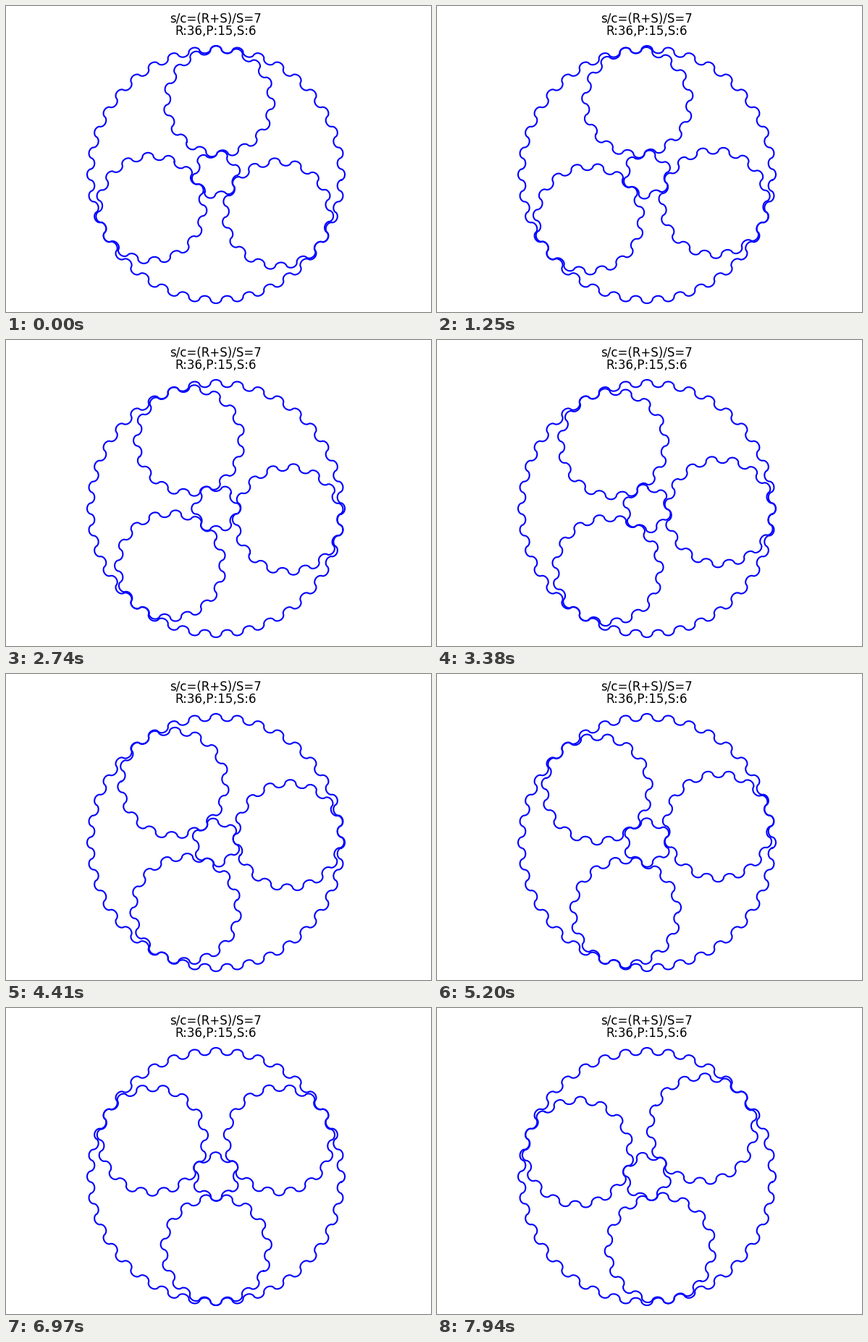
Write a matplotlib script that moves like this. It is 587 px wide and 423 px high and loops after 8000 ms.

```python
import numpy as np
import matplotlib.pyplot as plt
from matplotlib.animation import FuncAnimation

W, H, DPI = 587, 423, 100
LOOP, TICK = 8000, 20
STEP, FIRST = 60, 20       # the gears move on every 60 ms
RING, PLANET, SUN = 36, 15, 6
MODULE = 178 / 37          # pitch radius per tooth, in pixels
CENTER = 290 + 233j

# Carrier angle at a few moments; its speed drifts a little
KEY_MS = [0, 830, 2080, 3380, 4400, 6040, 7940]
KEY_DEG = [87.5, 93.7, 105.6, 117.5, 125.6, 141.1, 160.6]


def gear(teeth):
    """Cycloidal outline around 0 with one tooth tip at angle 0."""
    t = np.linspace(0, 2 * np.pi, teeth * 48 + 1)
    pitch, r = teeth * MODULE, MODULE / 2
    epi = (pitch + r) * np.exp(1j * t) - r * np.exp(1j * t * (2 * teeth + 1))
    hypo = (pitch - r) * np.exp(1j * t) + r * np.exp(-1j * t * (2 * teeth - 1))
    outline = np.where(np.sin(teeth * t) >= 0, epi, hypo)
    return outline * np.exp(-0.5j * np.pi / teeth)


def turn(deg):
    return np.exp(1j * np.radians(deg))


def place(line, outline, deg, offset=0):
    # y grows downwards on the stage, hence the conjugate
    z = CENTER + np.conj(outline * turn(deg) + offset)
    line.set_data(z.real, z.imag)


fig = plt.figure(figsize=(W / DPI, H / DPI), dpi=DPI, facecolor="white")
ax = fig.add_axes([0, 0, 1, 1])
ax.set_xlim(0, W)
ax.set_ylim(H, 0)
ax.axis("off")

title = dict(ha="center", va="baseline", fontsize=12, family="DejaVu Sans")
ax.text(289.5, 23, f"s/c=(R+S)/S={(RING + SUN) // SUN}", **title)
ax.text(289.5, 40, f"R:{RING},P:{PLANET},S:{SUN}", **title)


def new_line():
    return ax.plot([], [], color="blue", lw=1.5)[0]


planet_shape, sun_shape = gear(PLANET), gear(SUN)
place(new_line(), gear(RING), 0)
sun = new_line()
planets = [new_line() for _ in range(3)]


def draw(i):
    ms = max(0, (i * TICK - FIRST) // STEP * STEP + FIRST)
    carrier = np.interp(ms, KEY_MS, KEY_DEG)
    place(sun, sun_shape, carrier * (RING + SUN) / SUN)
    for n, line in enumerate(planets):
        a = carrier + 120 * n
        place(line, planet_shape, a * (PLANET - RING) / PLANET,
              (SUN + PLANET) * MODULE * turn(a))
    return [sun, *planets]


anim = FuncAnimation(fig, draw, frames=LOOP // TICK, interval=TICK,
                     repeat=True, repeat_delay=0)
plt.show()
```
